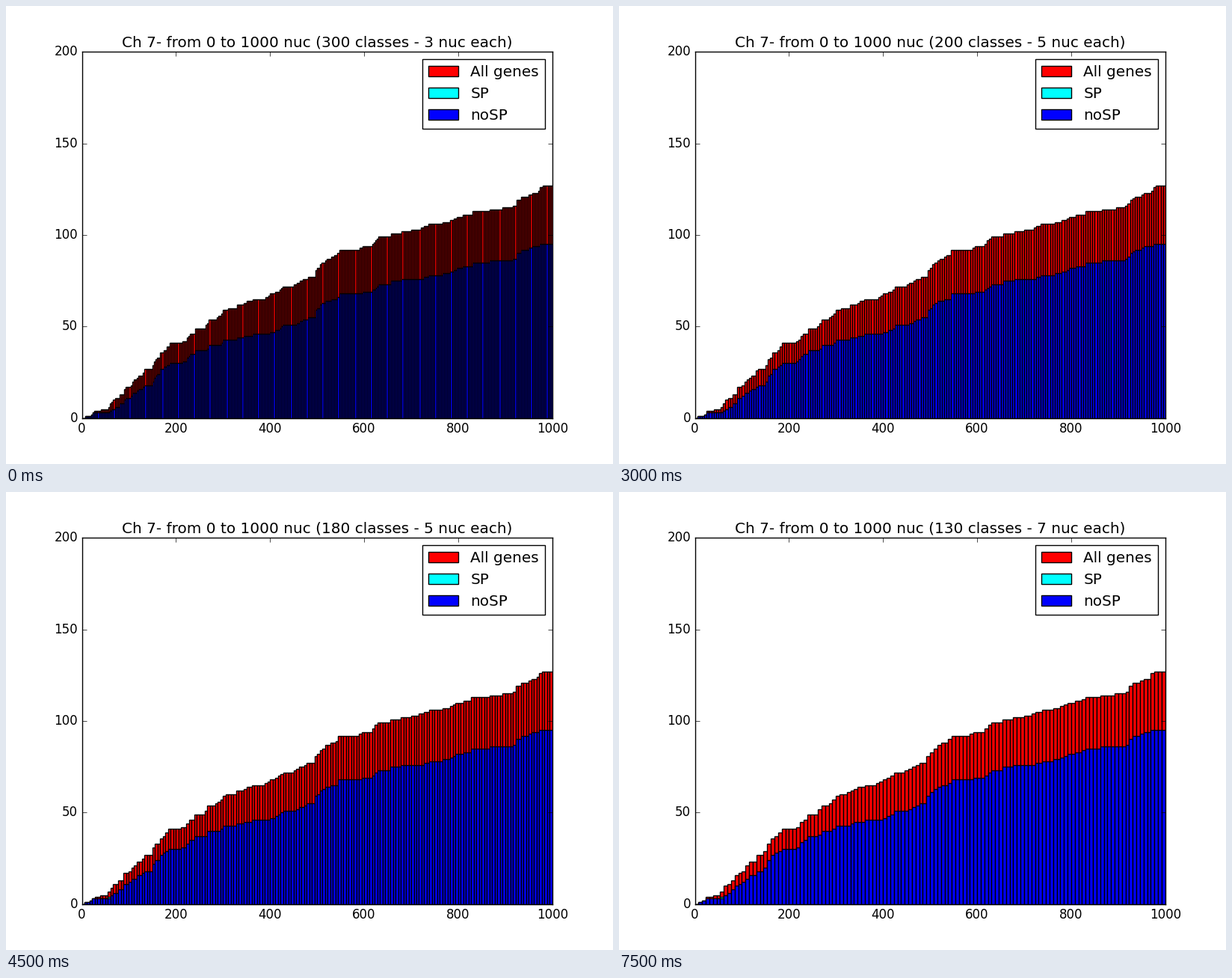
A matplotlib script for the animation above (8 s loop, 812 by 612 pixels).

```python
import matplotlib.pyplot as plt
from matplotlib.animation import FuncAnimation
from matplotlib.patches import Patch

plt.style.use("classic")
plt.rcParams["font.family"] = "DejaVu Sans"

# Gene positions along the chromosome, in nucleotides
SP = [29, 41, 57.5, 60.5, 68.5, 91, 112, 131.5, 134.5, 182, 188, 242, 264, 265,
      288, 293, 311, 330, 352, 391, 398, 452, 522, 539, 591, 622, 702, 722,
      895, 972, 976, 982]
NO_SP = [8, 21, 26.5, 62.5, 66, 71, 81, 82, 90.5, 92.2, 94, 104, 108, 109, 117,
         121, 132, 135, 151, 152.8, 155, 155, 158, 160.7, 168, 168, 169, 175,
         182, 188, 216, 224, 225, 228, 231, 241, 242, 268, 271, 272, 297, 301,
         301, 331, 345, 364, 402, 413, 421, 425, 429, 459, 465, 473, 482, 497,
         498, 498, 499, 502, 507, 509, 512, 517, 530.5, 545, 547, 548, 598,
         618, 624, 627, 631, 657, 658, 681, 728, 739, 768, 784, 791, 797, 812,
         830, 832, 868, 919, 924, 925, 926, 934, 936, 952, 958, 975]
SERIES = [("All genes", "red", SP + NO_SP),
          ("SP", "cyan", SP),
          ("noSP", "blue", NO_SP)]

SPAN = 1000
CLASSES = [300, 250, 200, 180, 150, 130]
HOLD = 3        # frames per class count
FRAMES = 16
INTERVAL = 500
WIDTH, HEIGHT, DPI = 812, 612, 100

# The small margin keeps the pixel size from being rounded down
fig = plt.figure(figsize=((WIDTH + 0.001) / DPI, (HEIGHT + 0.001) / DPI),
                 dpi=DPI, facecolor="white")
ax = fig.add_subplot(111)
title = ax.set_title("")


def build(classes):
    """Cumulative histograms of all series for one class count."""
    bars = []
    for _, color, values in SERIES:
        _, _, patches = ax.hist(values, bins=classes, range=(0, SPAN),
                                cumulative=True, color=color)
        bars.extend(patches)
    return bars


stages = [build(n) for n in CLASSES]
ax.legend(handles=[Patch(facecolor=c, label=name) for name, c, _ in SERIES],
          loc="upper right")
ax.set_ylim(0, 200)
ax.set_yticks(range(0, 201, 50))


def update(i):
    stage = min(i // HOLD, len(CLASSES) - 1)
    for k, bars in enumerate(stages):
        for bar in bars:
            bar.set_visible(k == stage)
    n = CLASSES[stage]
    title.set_text(f"Ch 7- from 0 to {SPAN} nuc "
                   f"({n} classes - {SPAN // n} nuc each)")
    # Rounding of the last bin edge pushes the axis one tick further
    right = 1200 if n == 150 else SPAN
    ax.set_xticks(range(0, right + 1, 200))
    ax.set_xlim(0, right)
    return []


anim = FuncAnimation(fig, update, frames=FRAMES, interval=INTERVAL,
                     init_func=lambda: update(0), repeat=True, blit=False)
plt.show()
```
